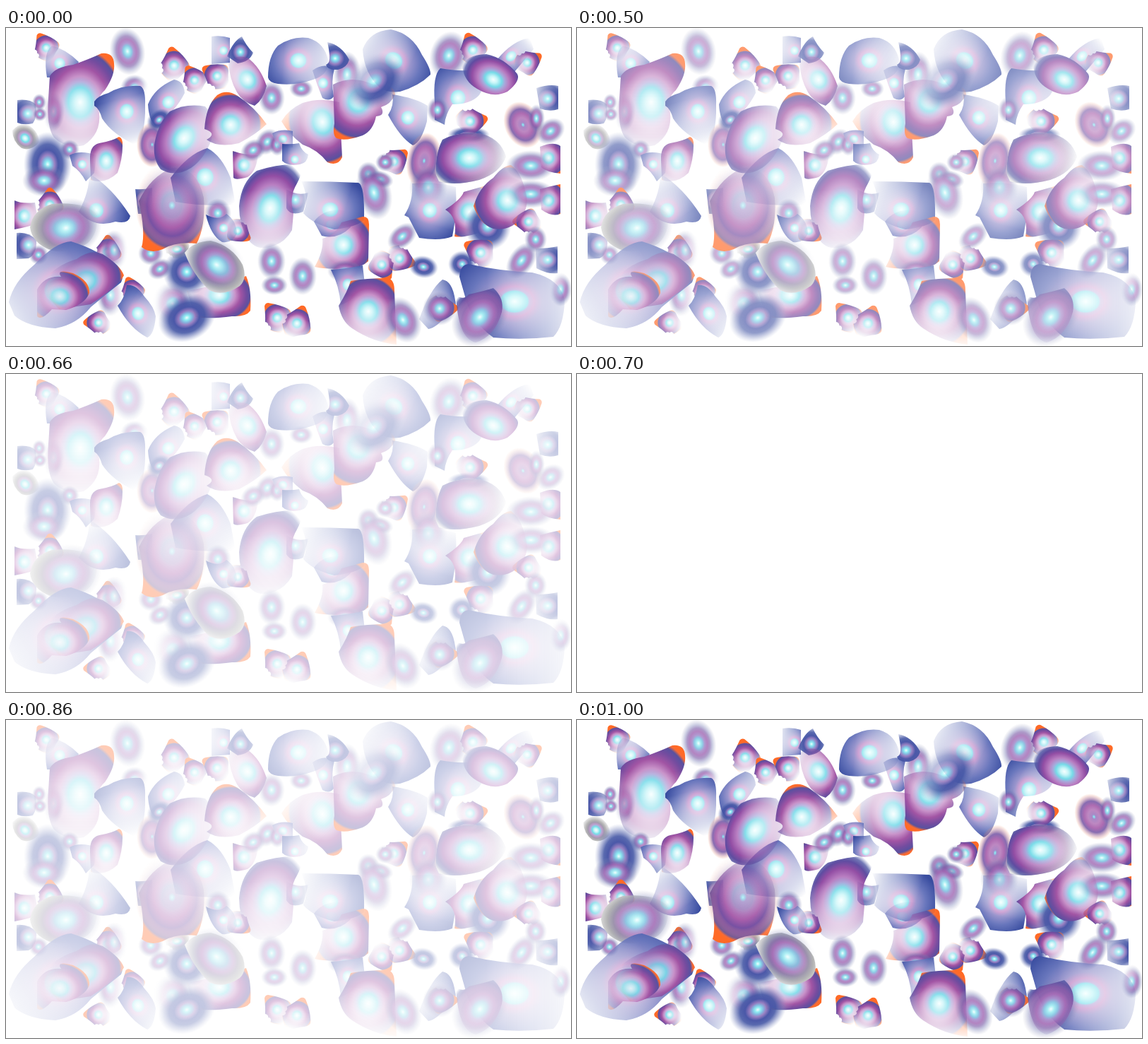
These frames come from a looping animation (800 px wide and 450 px high, 1100 ms). An HTML page with a canvas:

```html
<!DOCTYPE html>
<html lang="en">
<head>
<meta charset="utf-8">
<title>Pulsing blobs</title>
<style>
html, body { margin: 0; width: 100%; height: 100%; overflow: hidden; background: #fff; }
canvas { display: block; }
</style>
</head>
<body>
<canvas id="stage" width="800" height="450"></canvas>
<script>
const W = 800, H = 450;
const layer = () => Object.assign(document.createElement('canvas'), { width: W, height: H });
const stage = document.getElementById('stage').getContext('2d');
const art = layer(), artCtx = art.getContext('2d');
const scratch = layer(), ctx = scratch.getContext('2d');

const LEAF = new Path2D(
  'M-.98-.62Q-.95-.9-.65-.88Q0-.9 .6-.72Q.95-.62 .85-.2Q.7 .3 .75 .95Q.1 1-.3 .9Q-.25 .6-.5 .62Q-.55 .4-.75 .42Q-.8 0-.98-.62Z');

// Fills an elliptical gradient inside a path, then fades it out towards one side.
function paint(stops, x, y, rx, ry, rot, fade, path) {
  const a = (rot || 0) * Math.PI / 180;
  ctx.save();
  ctx.clearRect(0, 0, W, H);
  if (path && path !== LEAF) ctx.clip(new Path2D(path));
  ctx.translate(x, y);
  ctx.rotate(a);
  ctx.scale(rx, ry);
  if (path === LEAF) ctx.clip(LEAF);
  const g = ctx.createRadialGradient(0, 0, 0, 0, 0, 1);
  for (const [at, color] of stops) g.addColorStop(at, color);
  ctx.fillStyle = g;
  ctx.fillRect(-3, -3, 6, 6);
  ctx.restore();
  if (fade != null) {
    const f = fade * Math.PI / 180;
    const r = Math.hypot(rx * Math.cos(f - a), ry * Math.sin(f - a));
    const dx = Math.cos(f) * r, dy = Math.sin(f) * r;
    const m = ctx.createLinearGradient(x - dx * .4, y - dy * .4, x + dx * .95, y + dy * .95);
    m.addColorStop(0, '#000');
    m.addColorStop(1, '#0000');
    ctx.globalCompositeOperation = 'destination-in';
    ctx.fillStyle = m;
    ctx.fillRect(0, 0, W, H);
    ctx.globalCompositeOperation = 'source-over';
  }
  artCtx.drawImage(scratch, 0, 0);
}

const brush = (...stops) => (...args) => paint(stops, ...args);
const ember = brush([0, '#f6ffff'], [.12, '#c4f3f7'], [.26, '#78dbe9'], [.36, '#b7b0de'], [.46, '#c892c9'],
  [.62, '#a255a4'], [.78, '#744c9f'], [.89, '#58519f'], [.95, '#f96b33'], [1, '#ff6a26']);
const sky = brush([0, '#f4ffff'], [.1, '#c4f6f8'], [.19, '#8fe3ef'], [.22, '#bfaedd'], [.28, '#cb9bd0'],
  [.4, '#9b96cd'], [.65, '#6876bc'], [1, '#384c9f']);
const mist = brush([0, '#f4ffff'], [.12, '#a6ecf2'], [.24, '#8fc8e4'], [.35, '#a98fcce8'], [.5, '#a066b2cc'],
  [.64, '#7c5ea8a0'], [.8, '#7078b254'], [1, '#9090b000']);
const navy = brush([0, '#f0ffff'], [.1, '#8deaf1'], [.19, '#85b9e0'], [.29, '#9278beee'], [.44, '#4b58a8'],
  [.62, '#4053a3dd'], [.8, '#5060aa70'], [1, '#7f8cc000']);
const dusk = brush([0, '#f6ffff'], [.12, '#c9f6f8'], [.26, '#76dbe8'], [.36, '#a9a6da'], [.48, '#b97fc2'],
  [.66, '#934ea4'], [.8, '#5f4ca1'], [.9, '#4f57a4cc'], [1, '#6570b000']);
const ash = brush([0, '#f6ffff'], [.14, '#c4f6f8'], [.28, '#74dfe9'], [.36, '#a7b9de'], [.46, '#bd9bc9'],
  [.58, '#a39cae'], [.72, '#b4b4b4'], [1, '#efefef']);
const bloom = brush([0, '#9cf0f6'], [.05, '#8fc4e2'], [.1, '#a889c6'], [.3, '#b478b9e0'], [.5, '#a358a7e0'],
  [.68, '#7152a3d8'], [.84, '#b0789870'], [1, '#ff8a5000']);
// A notched scrap whose glowing corner points away from its fade.
const leaf = (x, y, r, fade) => ember(x, y, r, r, fade - 40, fade, LEAF);

// Top left
leaf(57, 28, 19, 60);
sky(76, 50, 36, 36, 0, 250, 'M58 70Q52 35 65 25Q85 30 103 48Q95 65 75 70Z');
mist(172, 33, 25, 34, -10);
mist(182, 84, 20, 18, 0, 45);
navy(31, 121, 32, 30, 0, 0, 'M16 102Q34 100 42 108Q45 125 38 135Q25 138 16 134Z');
mist(47, 105, 10, 12); mist(48, 122, 10, 10); mist(67, 118, 16, 28, 0, 180);
ember(105, 105, 64, 80, 0, 90,
  'M62 68Q70 55 95 52Q118 44 135 36Q152 34 153 50Q155 66 140 88Q126 100 132 120Q135 150 110 166Q85 172 68 155Q57 140 60 100Z');
sky(171, 118, 46, 50, 0, 75,
  'M125 104Q130 96 145 92Q165 80 190 82Q198 86 197 110Q198 150 184 166Q150 150 136 128Q132 114 125 110Z');
ash(27, 156, 21, 18, 45, null, 'M9 145Q20 133 33 138Q47 148 47 162Q35 175 22 170Q9 160 9 145Z');
mist(90, 172, 14, 14); sky(108, 193, 28, 28, 0, 0, 'M90 180Q105 172 128 180L125 205L113 217Q105 202 94 195Z');
navy(59, 193, 34, 46); mist(54, 216, 31, 23);
ember(142, 188, 32, 40, 0, 90, 'M119 187Q118 166 132 163Q150 160 160 154Q166 156 165 167Q165 185 158 205Q140 222 120 215Z');

// Upper middle left
bloom(207, 165, 22, 32);
sky(230, 105, 42, 40, -45, 0, 'M201 108Q210 85 238 73Q252 75 253 92Q240 118 212 139Q202 130 201 108Z');
navy(217, 130, 19, 15, -35);
leaf(238, 53, 22, 80); leaf(267, 74, 19, 60); leaf(299, 68, 20, 30);
sky(308, 32, 27, 28, 0, 190, 'M291 12Q305 10 317 14V49L291 51Z');
navy(332, 34, 25, 27, 0, null, 'M313 40Q322 18 334 12Q340 25 350 35Q345 48 328 50Z');
ember(342, 73, 38, 44, -30, 190, 'M315 48Q325 37 342 42Q360 55 369 82Q364 102 352 110Q335 105 327 91Q316 72 315 48Z');
mist(376, 99, 19, 24); mist(418, 86, 17, 13);
sky(282, 211, 56, 60, 0, 40, 'M233 212Q258 178 285 170Q305 180 318 212L325 250Q280 253 240 246Z');
dusk(252, 156, 48, 62, 35, 0,
  'M210 165Q215 135 232 118Q255 106 282 111Q296 125 291 158Q281 185 262 198Q240 212 219 200Q208 186 210 165Z');
ember(318, 137, 46, 46, 0, 60,
  'M281 143Q283 110 299 95Q312 86 328 96Q352 112 369 136Q355 150 330 163Q300 170 284 158Q300 149 281 143Z');

// Upper middle right
sky(449, 78, 32, 34, 0, 180, 'M434 60Q450 48 465 58Q460 75 464 97Q458 105 448 99Q440 80 434 60Z');
mist(483, 66, 20, 33, 0, 70);
navy(466, 43, 30, 28, 0, null, 'M455 20Q475 24 486 45Q483 56 470 59Q455 60 453 52Q462 50 455 20Z');
sky(414, 46, 54, 50, 0, 5,
  'M371 70Q371 40 385 25Q405 11 428 14Q451 21 456 45Q458 66 435 73Q410 82 385 79Q372 77 371 70Z');
sky(549, 46, 61, 54, 40, 205,
  'M505 30Q515 4 545 2Q575 8 589 38Q602 58 601 66Q585 82 558 90Q540 92 530 85Q507 65 505 30Z');
ember(448, 133, 51, 62, -10, 225,
  'M390 132Q400 115 420 106Q445 98 472 105L476 183Q470 196 455 190Q441 172 420 165Q400 150 390 132Z');
ember(499, 103, 52, 57, 15, 290,
  'M463 80Q490 66 520 80Q550 78 551 94Q545 108 531 112Q538 124 524 125Q520 145 505 152Q480 161 468 156Q462 152 465 135Z');
navy(521, 75, 47, 37, -35, 225);
sky(569, 127, 44, 46, 0, 320, 'M541 123Q550 110 547 94Q580 99 597 110L596 132Q588 162 576 166Q558 155 541 123Z');
mist(370, 161, 16, 20, 35); ember(337, 194, 26, 28, 0, 0, 'M321 174Q338 180 357 180Q354 204 342 211Q325 216 322 212Z');
mist(350, 173, 19, 15, -30); mist(384, 165, 12, 16);
sky(392, 157, 28, 26, 0, 100, 'M377 149Q390 142 406 146V169L385 171Z');
sky(409, 186, 26, 26, 0, 0, 'M391 164Q405 165 415 163Q419 175 428 179Q427 191 416 193Q399 196 391 188Z');

// Top right
mist(627, 39, 27, 35, 15); leaf(661, 31, 21, 70);
sky(715, 40, 38, 30, -45, 320, 'M695 45Q718 17 742 14L747 30L720 62Z');
sky(640, 99, 50, 54, 0, 25,
  'M607 105Q604 67 615 57Q640 62 671 59Q683 75 670 95Q658 108 632 108Q622 122 621 137L607 130Z');
mist(611, 116, 15, 19);
dusk(690, 73, 48, 37, 30, null,
  'M646 55Q650 38 680 37Q705 42 724 65Q729 75 710 90Q690 100 667 86Q649 76 646 55Z');
leaf(738, 49, 19, 150);
navy(767, 100, 31, 30, 0, 180, 'M751 85Q769 79 782 82V115Q770 119 756 114Z');
bloom(732, 137, 26, 34, -25);
mist(751, 128, 12, 20); mist(771, 146, 22, 17, -35);
navy(655, 151, 30, 12); leaf(657, 132, 21, 170);

// Right middle
bloom(592, 188, 25, 40, 8); mist(598, 226, 27, 33, 0, 75);
leaf(549, 189, 20, 140); mist(537, 190, 14, 13);
mist(513, 207, 16, 18); mist(530, 214, 19, 12, 15); mist(521, 233, 25, 39, -15);
mist(743, 195, 35, 22); ember(768, 184, 26, 27, 0, 180, 'M756 168Q775 160 785 167V206Q765 204 758 197Z');
mist(743, 235, 35, 20); ember(768, 244, 26, 27, 0, 180, 'M756 228Q770 224 785 221V263Q773 268 758 257Z');
leaf(740, 274, 19, 0);
ash(656, 184, 63, 46, 0, 0,
  'M609 208Q607 180 618 158Q640 146 670 149Q700 155 708 182Q700 205 670 215Q635 224 613 217Z');
dusk(656, 184, 57, 45, 0, 10,
  'M609 208Q607 180 618 158Q640 146 670 149Q700 155 708 182Q700 205 670 215Q635 224 613 217Z');
sky(600, 258, 47, 49, 0, 285,
  'M564 265Q577 245 575 220Q610 217 637 225Q639 260 632 295Q615 302 585 297Q577 282 570 268Z');
ember(656, 260, 40, 41, 0, 0, 'M622 257Q645 242 648 232L683 222V285Q650 298 635 295Q640 268 622 257Z');
navy(682, 281, 33, 34, -15);
leaf(672, 318, 22, 30); navy(646, 334, 20, 19);
ember(710, 244, 50, 51, 15, 330,
  'M662 252Q670 225 690 212Q703 195 715 194Q730 205 735 230Q742 250 730 268Q715 288 690 284Q671 278 662 252Z');
navy(767, 328, 31, 28, 0, 180, 'M750 312Q768 312 781 309V347Q768 349 751 340Z');
mist(750, 299, 16, 19); mist(730, 329, 29, 18, -55);

// Left middle
ember(26, 266, 26, 29, 0, 0, 'M12 244Q22 249 41 247L46 276Q30 282 12 285Z');
leaf(62, 250, 20, 90);
navy(32, 307, 31, 30, 0, 0, 'M15 290Q32 288 43 300Q44 320 32 326L15 327Z');
mist(46, 321, 14, 14); leaf(144, 317, 20, 90); mist(154, 314, 20, 28, 0, 0);
sky(128, 258, 47, 49, -20, 235, 'M103 260Q118 232 118 206Q150 225 176 266Q174 278 155 274Q125 284 103 260Z');
ash(85, 283, 58, 46, 0, 0,
  'M34 282Q38 257 65 249Q110 245 128 263Q132 290 115 305Q90 320 65 315Q37 305 34 282Z');
mist(85, 283, 51, 42, -15, 180);
navy(196, 244, 27, 32, 0, 0, 'M183 228Q195 229 207 226V263H187Z');
mist(205, 319, 18, 17); ash(242, 313, 20, 14, 0, 200, LEAF);
ember(235, 251, 54, 66, 0, 310,
  'M188 245Q205 210 235 198Q270 195 280 240Q283 280 270 305Q240 302 222 313Q205 320 192 310Q198 290 188 245Z');
bloom(235, 251, 52, 64, 0, 280);
mist(300, 262, 19, 21); leaf(328, 287, 18, 215);
sky(308, 283, 27, 27, 0, 0, 'M283 264Q302 274 312 263Q326 272 327 291Q321 305 306 303Q290 294 283 264Z');

// Centre
navy(410, 243, 27, 31, 0, 0, 'M397 228Q412 238 428 233L421 260Q403 267 397 255Z');
dusk(374, 255, 53, 70, 12, 85,
  'M330 252Q333 218 355 202Q385 192 413 193Q423 200 412 220Q400 240 407 262L405 286Q396 302 380 308Q355 318 342 298Q330 278 330 252Z');
sky(461, 278, 36, 32, 0, 270, 'M436 274Q450 255 480 258L488 282Q470 300 447 294Z');
sky(459, 257, 54, 48, 0, 195,
  'M421 262Q430 240 418 217Q460 217 499 219Q508 222 507 272Q495 282 465 285Q435 278 421 262Z');
ember(478, 307, 43, 46, 0, 200,
  'M437 338Q450 315 448 298Q468 292 475 275L505 267Q514 266 514 278L513 330Q500 342 480 340Q455 342 437 338Z');
mist(376, 330, 20, 26); mist(380, 364, 19, 14); mist(420, 351, 20, 27);
leaf(384, 410, 21, 50); leaf(412, 418, 22, 110);
mist(480, 344, 25, 16);
sky(484, 363, 34, 39, 0, 60, 'M460 342Q480 341 505 336L508 362Q500 382 474 392Q472 365 460 342Z');
leaf(532, 335, 20, 240); leaf(557, 326, 20, 200);
mist(561, 295, 24, 16, -40); navy(591, 338, 21, 16, 10);
ember(513, 401, 48, 52, 0, 95,
  'M471 393Q484 372 488 358Q510 354 540 354Q550 355 550 372L553 448Q520 445 490 425Q475 415 471 393Z');
mist(562, 413, 25, 34, -25);

// Bottom left
mist(218, 341, 18, 14, -30); navy(256, 345, 34, 34, 35); mist(236, 390, 30, 31, 0, 180);
ember(302, 378, 49, 39, 0, 215, 'M256 372Q300 364 340 351Q348 370 346 400Q340 409 320 408Q290 412 268 409Z');
navy(256, 410, 42, 33, -25);
ash(300, 336, 52, 40, 40, null,
  'M253 318Q265 302 290 301Q320 308 335 335Q342 355 331 365Q308 381 288 371Q265 350 253 318Z');
mist(298, 335, 46, 37, 40, 20);
leaf(179, 373, 18, 70);
sky(187, 404, 40, 44, -20, 30, 'M158 393Q167 385 171 364Q184 362 196 380Q210 395 212 408Q210 434 200 438Q175 425 158 393Z');
mist(148, 378, 20, 30, 0, 0); leaf(131, 417, 18, 0);
sky(75, 370, 100, 90, -20, 150,
  'M4 388Q10 360 40 335Q70 303 92 302Q135 315 160 340Q168 350 163 360Q140 378 120 395Q100 420 70 425Q30 423 12 407Z');
ember(112, 358, 56, 47, -20, 190,
  'M45 365Q70 335 100 327Q120 312 137 320Q162 336 167 350Q161 364 120 391L75 398Z');
ember(76, 380, 44, 38, 0, 180,
  'M44 370Q55 350 78 352Q70 340 95 347Q119 358 118 375Q112 391 85 399L65 398Q50 415 44 408Z');

// Bottom right
mist(785, 370, 16, 24, 0, 200);
sky(720, 387, 98, 76, 0, 0,
  'M642 352Q643 335 655 334Q700 344 745 346Q785 355 791 385Q790 422 775 437Q730 442 690 438Q658 415 650 380Z');
sky(614, 397, 35, 42, 0, 190, 'M585 412Q600 370 618 356Q632 358 636 385Q640 398 625 405Q610 424 598 426Z');
leaf(616, 396, 20, 180); mist(614, 397, 24, 24, -40);
dusk(671, 409, 42, 50, 40, 100,
  'M637 378Q648 386 655 377Q678 372 690 368Q706 382 702 402Q692 437 665 445Q640 440 637 378Z');
mist(671, 409, 36, 46, 40);

// Holds, then dims and recovers in three hard steps each way.
function frame() {
  const step = Math.max(0, Math.floor(performance.now() % 1100 / 100) - 4);
  stage.globalAlpha = 1;
  stage.fillStyle = '#fff';
  stage.fillRect(0, 0, W, H);
  stage.globalAlpha = Math.abs(step - 3) / 3;
  stage.drawImage(art, 0, 0);
  requestAnimationFrame(frame);
}
frame();
</script>
</body>
</html>
```
